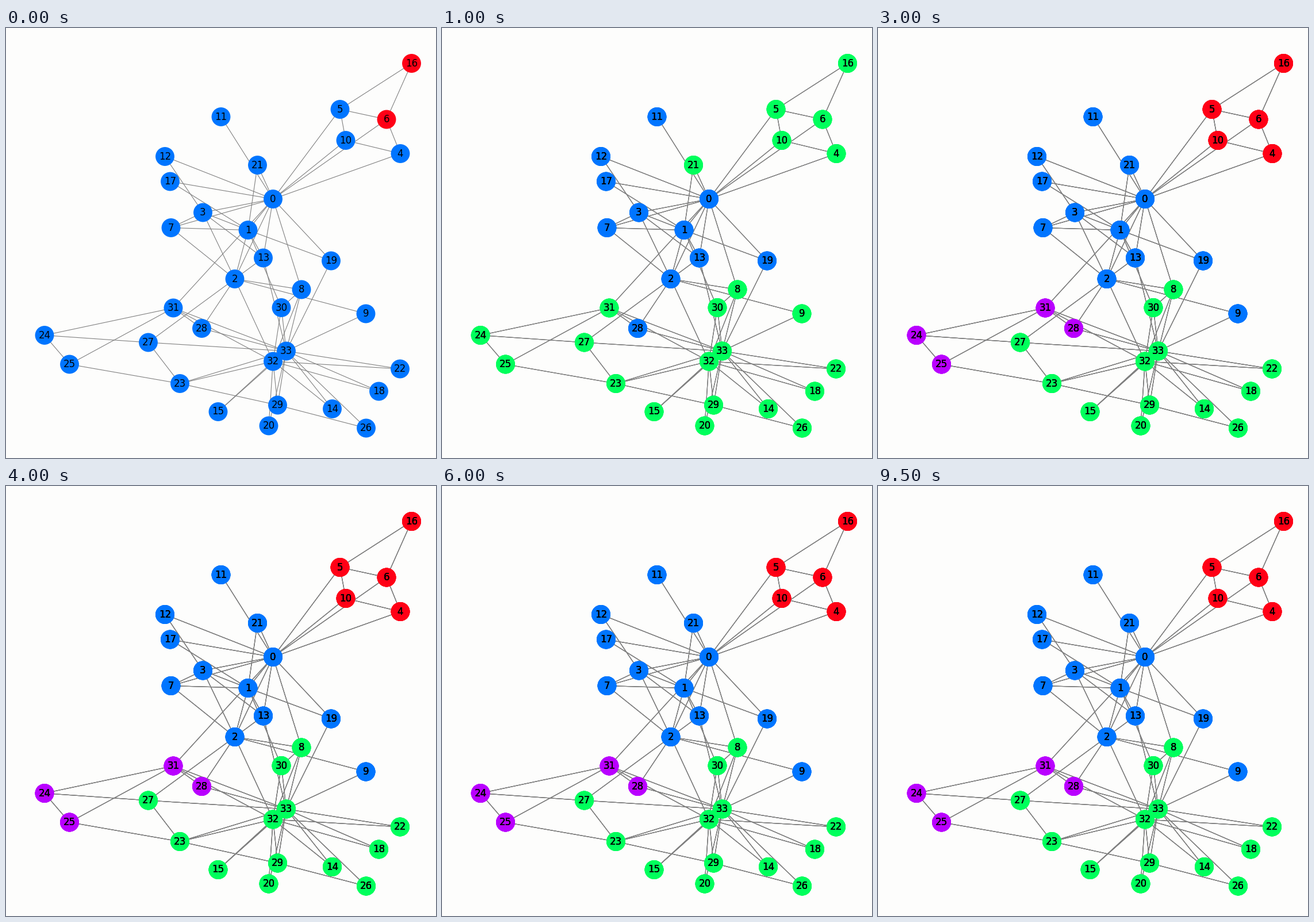
Animation of 748 by 748 pixels, one loop 10000 ms. Source, as a matplotlib script:

```python
from itertools import combinations, product

import matplotlib.pyplot as plt
from matplotlib.animation import FuncAnimation
from matplotlib.collections import LineCollection

SIZE, DPI = 748, 100
FRAMES, INTERVAL = 20, 500
PASSES = 4
BLUE, RED, GREEN, PURPLE = "#0075ff", "#ff0016", "#00ff5c", "#b900ff"

# One key point per node, in label order.
POINTS = [
    (464.5, 297.5), (421, 351.5), (398, 436.5), (342.5, 321), (686, 218.5),
    (581, 141.5), (662, 159), (287, 347.5), (514, 455), (626, 497),
    (591, 195.5), (374, 154.5), (276.5, 223.5), (447.5, 400), (567.5, 662.5),
    (369, 667.5), (705.5, 61.5), (285.5, 267), (648.5, 632), (565.5, 405),
    (457, 692), (437.5, 238.5), (685.5, 593), (302.5, 618.5), (67, 534.5),
    (110.5, 585), (626.5, 696), (247.5, 547), (340.5, 522.5), (472.5, 656),
    (479, 486.5), (291, 487), (464.5, 580), (487.5, 562),
]


def graph_edges():
    """Join the nodes of overlapping cliques, then add the loose links."""
    core, hubs = (0, 1, 2, 3), (32, 33)
    cliques = [(*core, 7), (*core, 13), (0, 3, 12), (0, 2, 8), (2, 8, 32),
               (5, 6, 16), (24, 25, 31), (23, 27, 33), (26, 29, 33),
               (28, 31, 33), (8, 30, *hubs), (23, 29, *hubs)]
    cliques += [(0, 1, n) for n in (17, 19, 21)]
    cliques += [(0, *pair) for pair in product((4, 5), (6, 10))]
    cliques += [(n, *hubs) for n in (14, 15, 18, 20, 22, 31)]
    edges = {pair for clique in cliques for pair in combinations(clique, 2)}
    edges |= set(product((0,), (11, 31))) | set(product((2,), (9, 27, 28)))
    edges |= set(product((9, 13, 19), (33,))) | {(1, 30), (23, 25), (24, 27)}
    return sorted(edges)


def node_colors(frame):
    """Communities are swapped at once as the search finds better ones."""
    outer = {4, 5, 6, 10, 16}
    left = {24, 25, 28, 31}
    center = {*range(4), 7, *range(11, 14), 17, 19}
    if frame < 1:
        base, groups = BLUE, {RED: {6, 16}}
    elif frame < 3:
        base, groups = GREEN, {BLUE: center | {28}}
    elif frame < 6:
        base, groups = GREEN, {BLUE: center | {9, 21, 28, 31}}
    else:
        base, groups = GREEN, {BLUE: center | {9, 21}, RED: outer, PURPLE: left}
    owner = {node: color for color, group in groups.items() for node in group}
    return [owner.get(node, base) for node in range(len(POINTS))]


fig = plt.figure(figsize=(SIZE / DPI, SIZE / DPI), dpi=DPI, facecolor="#fdfdfc")
ax = fig.add_axes([0, 0, 1, 1])
ax.set(xlim=(0, SIZE), ylim=(SIZE, 0))
ax.axis("off")
SEGMENTS = [(POINTS[a], POINTS[b]) for a, b in graph_edges()]


def make_pass():
    """Build one full drawing of the graph."""
    edges = ax.add_collection(
        LineCollection(SEGMENTS, colors="gray", linewidths=0.8, zorder=1))
    nodes = ax.scatter(*zip(*POINTS), s=560, linewidths=0, zorder=2)
    labels = [ax.text(x, y, str(i), size=12, family="DejaVu Sans",
                      ha="center", va="center", zorder=3)
              for i, (x, y) in enumerate(POINTS)]
    return nodes, [edges, nodes, *labels]


passes = [make_pass() for _ in range(PASSES)]


def draw(frame):
    # Repeated passes make the soft outlines heavier after the start.
    colors = node_colors(frame)
    for i, (nodes, artists) in enumerate(passes):
        nodes.set_facecolor(colors)
        for artist in artists:
            artist.set_visible(i <= frame)
    return []


anim = FuncAnimation(fig, draw, frames=FRAMES, interval=INTERVAL,
                     init_func=lambda: draw(0), repeat=True, repeat_delay=0)
plt.show()
```
